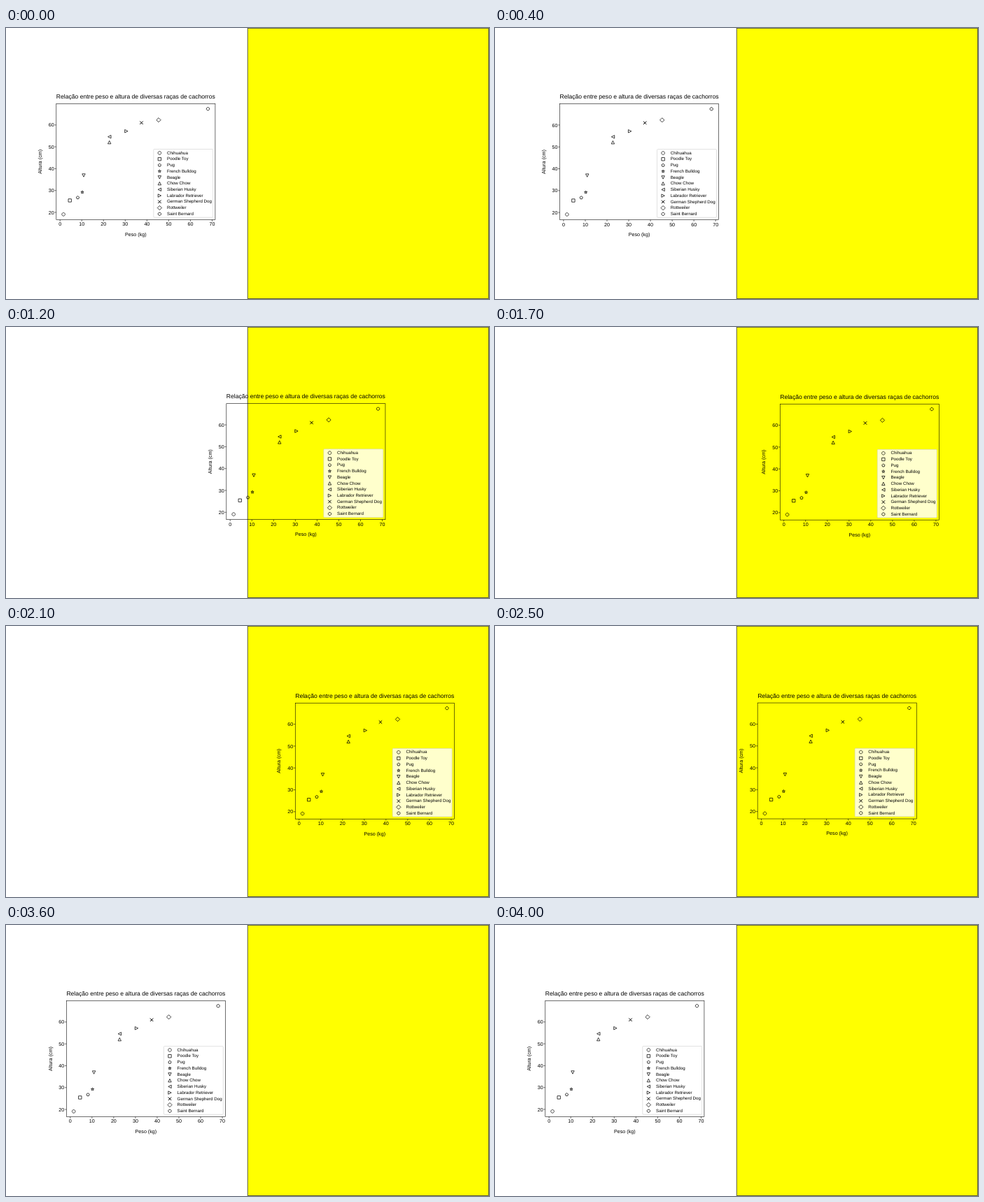
Write an HTML page that moves like this. It is 690x388 px and loops after 4.1 s.

```html
<!DOCTYPE html>
<html lang="pt">
<head>
<meta charset="utf-8">
<title>Peso e altura</title>
<style>
  html, body { margin: 0; width: 100%; height: 100%; overflow: hidden; background: #fff; }
  svg { display: block; width: 690px; height: 388px; }
  text { font: 7.15px "Liberation Sans", Arial, sans-serif; text-rendering: geometricPrecision; }
  .mid { text-anchor: middle; }
  .end { text-anchor: end; }
  .title { font-size: 8.58px; }
  .key { font-size: 6.2px; }
  .axis { fill: none; stroke: #000; stroke-width: .57; }
  .mark { fill: none; stroke: #000; stroke-width: .75; }
  .cross { stroke-width: 1; }
  .legend { fill: #fff; fill-opacity: .8; stroke: #ccc; stroke-opacity: .8; stroke-width: .7; }
  .panel { fill: #ff0; stroke: #333; stroke-width: .8; }
</style>
</head>
<body>
<svg viewBox="0 0 690 388">
  <rect class="panel" x="345.2" y=".3" width="344.4" height="387.2"/>
  <g id="chart"></g>
</svg>
<script>
const chart = document.getElementById('chart');

function add(tag, attrs, content = '') {
  const el = document.createElementNS('http://www.w3.org/2000/svg', tag);
  for (const key in attrs) el.setAttribute(key, attrs[key]);
  el.textContent = content;
  chart.append(el);
}
const label = (x, y, cls, content, extra) => add('text', { x, y, class: cls, ...extra }, content);

// Closed polygon around the origin, starting at the top; inner < 1 makes a star
function ring(n, r, turn = 0, inner = 1) {
  const points = Array.from({ length: n }, (_, i) => {
    const a = (turn + i / n) * 2 * Math.PI;
    const q = i % 2 ? r * inner : r;
    return `${(q * Math.sin(a)).toFixed(2)},${(-q * Math.cos(a)).toFixed(2)}`;
  });
  return `M${points.join('L')}Z`;
}

const R = 2.2;
const breeds = [
  ['Chihuahua', 82.1, 266.8, ring(40, 2.3)],
  ['Poodle Toy', 91.2, 246.9, ring(4, R * Math.SQRT2, 1 / 8)],
  ['Pug', 102.5, 242.8, ring(5, R)],
  ['French Bulldog', 109, 235.1, ring(10, R, 0, .381)],
  ['Beagle', 111, 211, `M${-R},${-R}H${R}L0,${R}Z`],
  ['Chow Chow', 147.7, 163.6, `M${-R},${R}H${R}L0,${-R}Z`],
  ['Siberian Husky', 147.8, 155.7, `M${R},${-R}V${R}L${-R},0Z`],
  ['Labrador Retriever', 171.9, 147.7, `M${-R},${-R}V${R}L${R},0Z`],
  ['German Shepherd Dog', 193.5, 135.7, `M${-R},${-R}L${R},${R}M${-R},${R}L${R},${-R}`],
  ['Rottweiler', 218, 131.7, ring(4, R * Math.SQRT2)],
  ['Saint Bernard', 288.5, 115.8, ring(8, 2.25, 1 / 16)]
];

function mark(x, y, d, name) {
  const cls = name.startsWith('German') ? 'mark cross' : 'mark';
  add('path', { d, class: cls, transform: `translate(${x} ${y})` });
}

function drawChart() {
  label(185.3, 101, 'mid title', 'Relação entre peso e altura de diversas raças de cachorros');
  label(185.3, 297.8, 'mid', 'Peso (kg)');
  label(0, 0, 'mid', 'Altura (cm)', { transform: 'translate(51 191.4) rotate(-90)' });
  add('rect', { x: 71.8, y: 108.4, width: 227.1, height: 166, class: 'axis' });
  for (let kg = 0; kg <= 70; kg += 10) {
    const x = 77.2 + 3.104 * kg;
    add('path', { d: `M${x},274.4v2.5`, class: 'axis' });
    label(x, 283.4, 'mid', kg);
  }
  for (let cm = 20; cm <= 60; cm += 10) {
    const y = 138.8 + 3.13 * (60 - cm);
    add('path', { d: `M71.8,${y}h-2.5`, class: 'axis' });
    label(68.7, y + 2.6, 'end', cm);
  }
  for (const [name, x, y, shape] of breeds) mark(x, y, shape, name);
  add('rect', { x: 210.8, y: 173.5, width: 84.9, height: 97.7, rx: 1.2, class: 'legend' });
  breeds.forEach(([name, , , shape], i) => {
    const y = 178.5 + 8.73 * i;
    mark(219.4, y + .4, shape, name);
    label(230, y + 2.1, 'key', name);
  });
}

const LOOP = 4100, STEP = 100;
const TRAVEL = 341.5, RISE = 1.85;
const MOVE = 1770, RAMP = 757, GO = 95, BACK = 2086;

// Constant acceleration, cruise, constant braking: progress 0..1
function glide(t) {
  if (t <= 0) return 0;
  if (t >= MOVE) return 1;
  if (t > MOVE / 2) return 1 - glide(MOVE - t);
  const way = t < RAMP ? t * t / (2 * RAMP) : t - RAMP / 2;
  return way / (MOVE - RAMP);
}

function tick() {
  const t = Math.floor(performance.now() % LOOP / STEP) * STEP;
  const p = glide(t - GO) - glide(t - BACK);
  chart.setAttribute('transform', `translate(${TRAVEL * p} ${RISE * p})`);
  requestAnimationFrame(tick);
}

drawChart();
tick();
</script>
</body>
</html>
```
